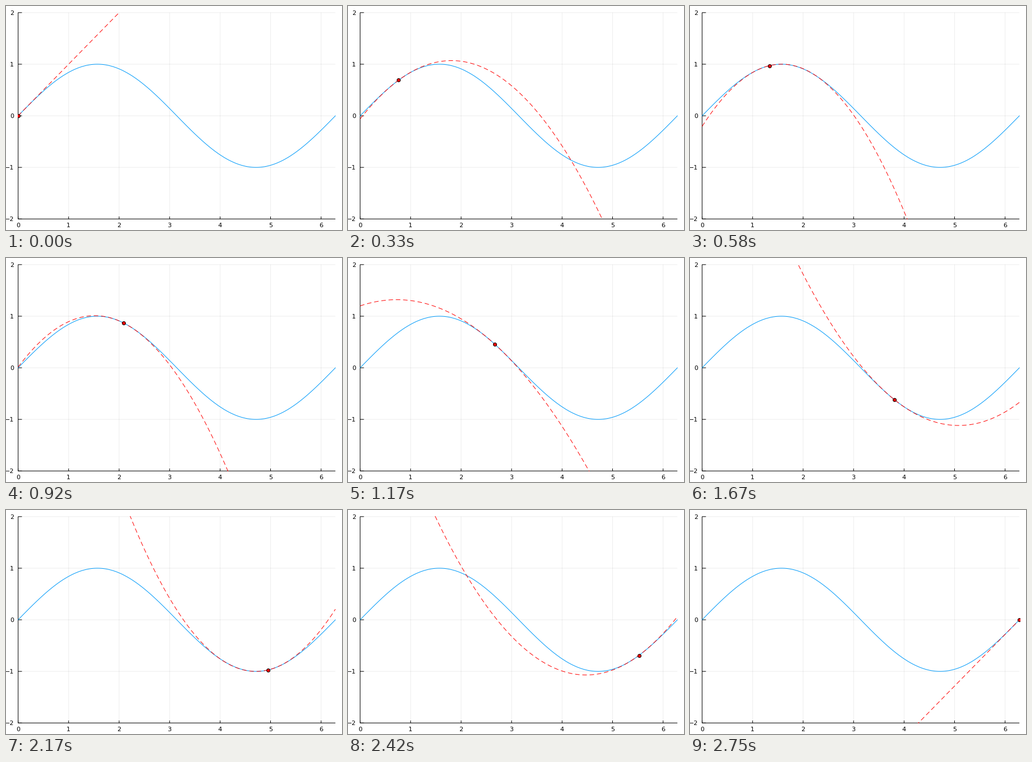
These frames come from a looping animation (600 px wide and 400 px high, 2830 ms). A matplotlib script:

```python
import matplotlib.pyplot as plt
import numpy as np
from matplotlib.animation import FuncAnimation
from matplotlib.transforms import Bbox

W, H, DPI = 600, 400, 100
LEFT, RIGHT, TOP, BOTTOM = 21.65, 588.19, 11.81, 380.31
TAU = 2 * np.pi
STEPS = 34            # positions of the expansion point
TICKS, TICK_MS = 283, 10
PIXEL = 72 / DPI      # one pixel in points
DASH = (8, 5)

plt.rcParams["font.family"] = "DejaVu Sans"
plt.rcParams["path.simplify"] = False


def px(x):
    return LEFT + x * (RIGHT - LEFT) / TAU


def py(y):
    return TOP + (2 - y) * (BOTTOM - TOP) / 4


fig = plt.figure(figsize=(W / DPI, H / DPI), dpi=DPI, facecolor="white")
ax = fig.add_axes([0, 0, 1, 1])
ax.set(xlim=(0, W), ylim=(H, 0))
ax.axis("off")
clip = Bbox.from_extents(21, H - 381, 589, H - 11)


def segment(x0, y0, x1, y1, **style):
    ax.plot([x0, x1], [y0, y1], color="black", lw=PIXEL, snap=False,
            solid_capstyle="butt", **style)


def label(x, y, value, ha):
    ax.text(x, y, str(value).replace("-", "\u2212"), size=8, ha=ha, va="baseline")


def series(**style):
    line, = ax.plot([], [], snap=False, **style)
    line.set_clip_box(clip)
    return line


for i in range(7):
    x = px(i)
    segment(x, TOP, x, BOTTOM, alpha=0.07, zorder=1)
    segment(x, BOTTOM, x, BOTTOM - 4.4, zorder=2)
    label(x, 395, i, "center")
for j in range(-2, 3):
    y = py(j)
    segment(LEFT, y, RIGHT, y, alpha=0.07, zorder=1)
    segment(LEFT, y, LEFT + 6.8, y, zorder=2)
    label(14, y + 4, j, "right")
segment(LEFT, BOTTOM, RIGHT, BOTTOM, zorder=2)
segment(LEFT, TOP, LEFT, BOTTOM, zorder=2)

xs = np.linspace(0, TAU, 400)
wave = series(color="#009afa", lw=PIXEL, zorder=3)
wave.set_data(px(xs), py(np.sin(xs)))
taylor = series(color="red", lw=PIXEL, dash_capstyle="butt", zorder=4)
point = series(marker="o", ms=6 * PIXEL, mfc="red", mec="black",
               mew=PIXEL, ls="none", zorder=5)


def update(tick):
    step = (6 * tick + 3) // 50
    a = TAU * step / (STEPS - 1)
    d = xs - a
    ys = np.sin(a) + np.cos(a) * d - np.sin(a) * d**2 / 2
    u, v = px(xs), py(ys)

    # Start at the visible part, keeping the dash phase of the whole curve.
    first = np.argmax(np.abs(ys) < 2.1)
    hidden = np.hypot(np.diff(u), np.diff(v))[:first].sum()
    taylor.set_data(u[first:], v[first:])
    taylor.set_linestyle((hidden % sum(DASH), DASH))
    point.set_data([px(a)], [py(np.sin(a))])
    return taylor, point


anim = FuncAnimation(fig, update, frames=TICKS, interval=TICK_MS,
                     repeat=True, repeat_delay=0, blit=False)
plt.show()
```
